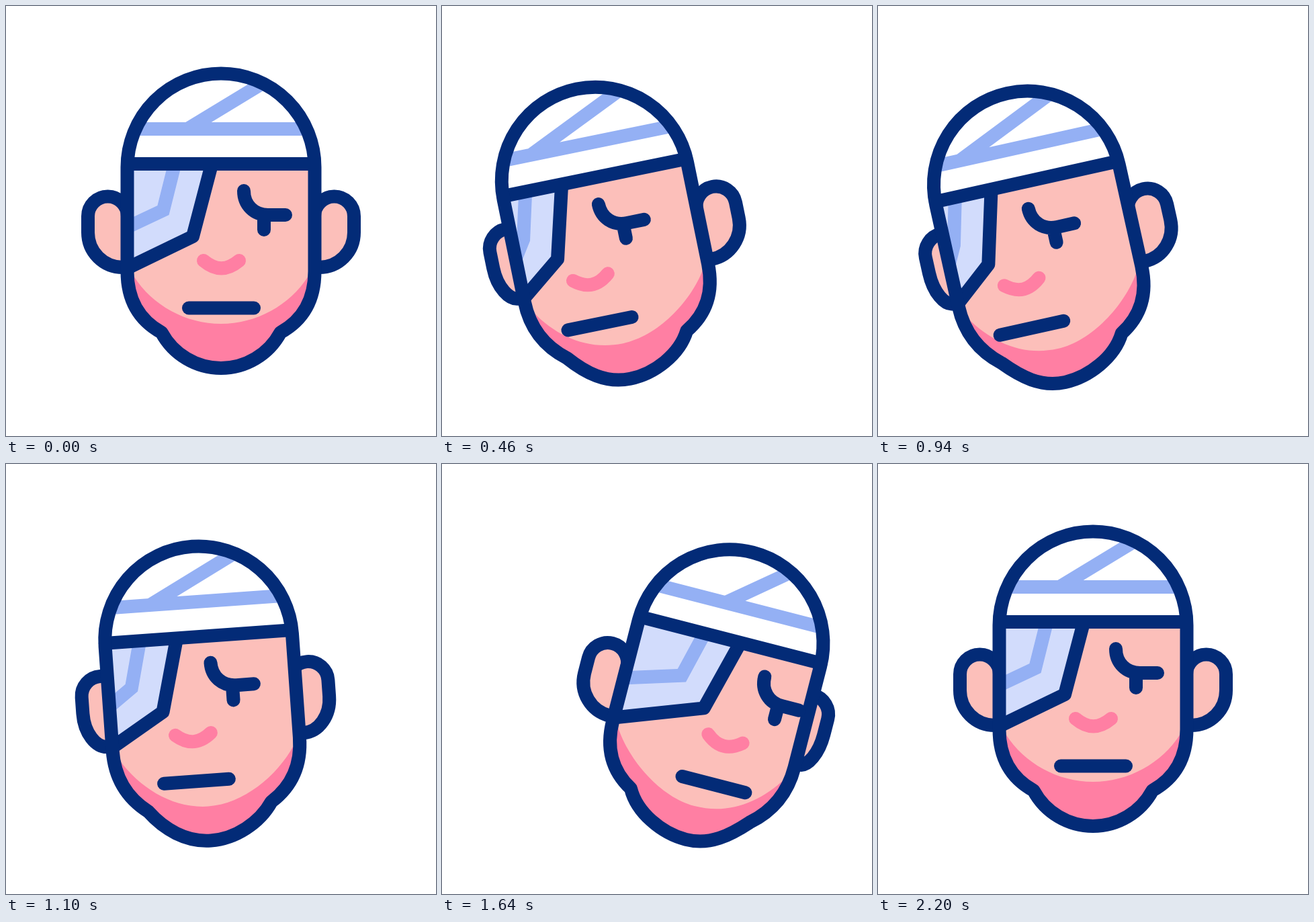
These frames come from a looping animation (640x640 px, 2.4 s). An HTML page with a canvas:

```html
<!DOCTYPE html>
<html lang="en">
<head>
<meta charset="utf-8">
<title>Bandaged head</title>
<style>
html, body { margin: 0; height: 100%; overflow: hidden; background: #fff; }
canvas { display: block; }
</style>
</head>
<body>
<canvas id="stage" width="640" height="640"></canvas>
<script>
const ctx = document.getElementById('stage').getContext('2d');
const NAVY = '#032b77', SKIN = '#fcbfba', PINK = '#ff7fa3', BLUE = '#94b0f4', PALE = '#d2dcfc';
const LOOP = 2400, LEFT_AT = 748, RIGHT_AT = 1518, REST_AT = 2200;

// cubic-bezier(.75, 0, .25, 1)
function ease(x) {
  let lo = 0, hi = 1;
  for (let i = 0; i < 24; i++) {
    const s = (lo + hi) / 2;
    if (2.25 * s - 3.75 * s * s + 2.5 * s ** 3 < x) lo = s; else hi = s;
  }
  return lo * lo * (3 - 2 * lo);
}

// Weights of the left and right poses
function poseAt(t) {
  if (t < LEFT_AT) return [ease(t / LEFT_AT), 0];
  if (t < RIGHT_AT) {
    const p = ease((t - LEFT_AT) / (RIGHT_AT - LEFT_AT));
    return [1 - p, p];
  }
  if (t < REST_AT) return [0, 1 - ease((t - RIGHT_AT) / (REST_AT - RIGHT_AT))];
  return [0, 0];
}

function fill(d, color) {
  ctx.fillStyle = color;
  ctx.fill(new Path2D(d));
}

function stroke(d, color = NAVY, cap = 'round', join = 'round') {
  ctx.strokeStyle = color;
  ctx.lineCap = cap;
  ctx.lineJoin = join;
  ctx.lineWidth = 20;
  ctx.stroke(new Path2D(d));
}

// The outer edge moves inward while the lobe stays attached to the head
function ear(side, inward) {
  const outer = inward - 198;
  const d = `M${outer + 59} 73A29.5 29.5 0 0 0 ${outer} 73V97
    C${outer} 126 ${-175 + inward * 0.6} 149-146 149H-130V73`;
  ctx.save();
  ctx.scale(side, 1);
  fill(d, SKIN);
  stroke(d);
  ctx.restore();
}

// Coordinates are relative to the centre of the skull
function drawHead(left, right) {
  const turn = 29.8 * right - 44.5 * left;
  const chin = 10 * (right - left);
  const head = `M-139.5 155V0A139.5 139.5 0 0 1 139.5 0V155
    C139.5 198 ${121 + right} 228 ${88.5 + 7 * right} ${246 + 5 * right}
    C${71 + right} ${278.5 - 2 * right} ${37 + chin} 299 ${chin} 299
    C${chin - 37} 299 ${-71 - left} ${278.5 - 2 * left} ${-88.5 - 7 * left} ${246 + 5 * left}
    C${-121 - left} 228-139.5 198-139.5 155Z`;
  const patch = `M${turn - 15} 0L${turn - 42} 103L-139 150`;
  const shadeLeft = 162 + 13 * left, shadeRight = 162 + 13 * right;
  const shadeLow = 233 + 15 * (left + right);

  ear(1, 28 * left);
  ear(-1, 29 * right);
  fill(head, SKIN);

  ctx.save();
  ctx.clip(new Path2D(head));
  fill(`M-145 ${shadeLeft - 24}L-130 ${shadeLeft}
    C-102 ${shadeLeft + 44} ${chin - 52} ${shadeLow} ${chin} ${shadeLow}
    S102 ${shadeRight + 44} 130 ${shadeRight}L145 ${shadeRight - 24}V320H-145Z`, PINK);
  fill('M-150-150H150V-5H-150Z', '#fff');
  stroke(`M-150-57H150M${turn - 50}-57L62-125`, BLUE, 'butt');
  ctx.save();
  ctx.clip(new Path2D(patch + 'V0Z'));
  fill('M-150-5H150V160H-150Z', PALE);
  stroke(`M${turn - 70} 0L${turn - 86} 64L-139 89`, BLUE, 'square', 'miter');
  ctx.restore();
  stroke(patch);
  ctx.restore();

  stroke('M-139-5H139');
  stroke(head);

  ctx.translate(turn, 0);
  stroke('M34 35C34 56 49 71 70 71H96M64 73V93');
  stroke('M-26 139C-8 154 9 154 27 139', PINK);
  stroke('M-48 209.5H49');
}

function render(t) {
  const [left, right] = poseAt(t);
  const tilt = left + right;
  const x = (61.1 * right - 62.4 * left) * (1 + 0.2 * (1 - tilt));
  const y = 21.5 * tilt ** 1.4;
  ctx.fillStyle = '#fff';
  ctx.fillRect(0, 0, 640, 640);
  ctx.save();
  ctx.translate(320 + x, 433 + y);
  ctx.rotate((14.8 * right - 14.1 * left) * Math.PI / 180);
  ctx.translate(0, -193);
  drawHead(left, right);
  ctx.restore();
}

function tick(now) {
  render(now % LOOP);
  requestAnimationFrame(tick);
}
render(0);
requestAnimationFrame(tick);
</script>
</body>
</html>
```
